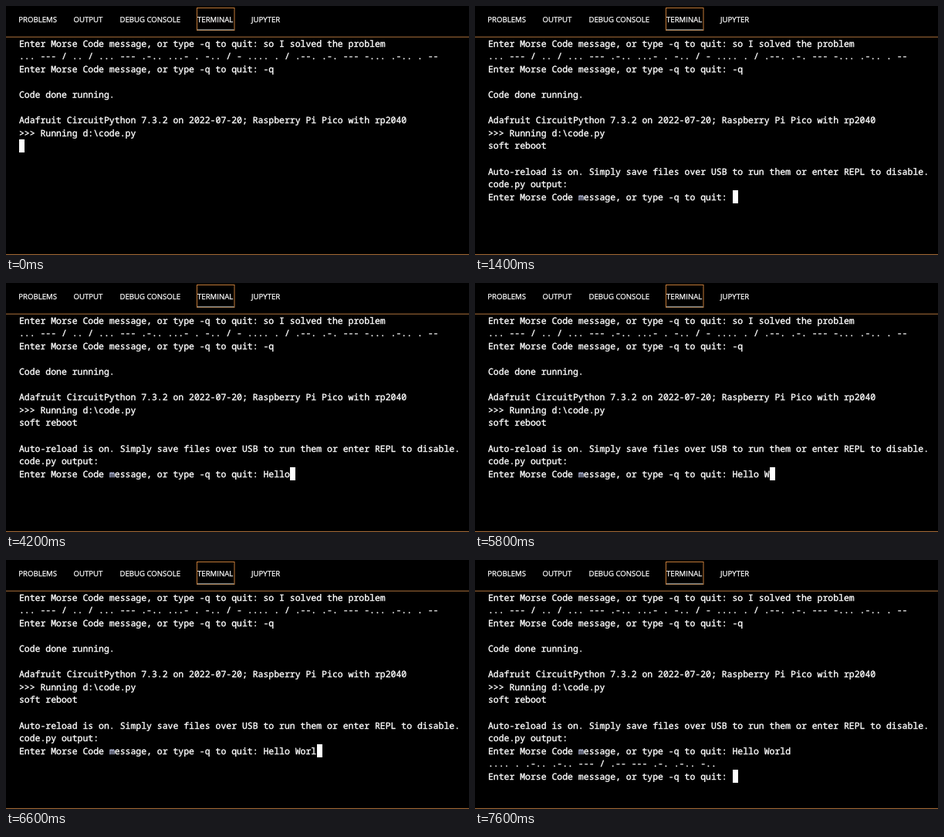
Write an HTML page that moves like this. It is 600 px wide and 323 px high and loops after 8000 ms.

```html
<!DOCTYPE html>
<html lang="en">
<head>
<meta charset="utf-8">
<title>Morse code terminal</title>
<style>
  html, body { margin: 0; width: 100%; height: 100%; overflow: hidden; background: #000; }
  svg { display: block; width: 600px; height: 323px; }
  text { fill: #fff; stroke: #fff; stroke-width: .35px; white-space: pre; text-rendering: geometricPrecision; }
  .tabs text { font: 9.6px "Open Sans", "Noto Sans", sans-serif; stroke-width: .25px; }
  .rows text { font: 11.488px "Noto Sans Mono", "DejaVu Sans Mono", monospace; }
  .edge { fill: none; stroke: #b0733c; }
  .focus { fill: none; stroke: #c27a38; }
  .underline { stroke: #8fa3b0; }
  .pointed { fill: #c4ccf0; stroke: #c4ccf0; }
</style>
</head>
<body>
<svg viewBox="0 0 600 323">
  <rect width="600" height="323"/>
  <g class="tabs">
    <text x="16.3" y="21">PROBLEMS</text>
    <text x="87.5" y="21">OUTPUT</text>
    <text x="147.4" y="21">DEBUG CONSOLE</text>
    <text x="248" y="21">TERMINAL</text>
    <text x="318" y="21">JUPYTER</text>
  </g>
  <rect class="focus" x="247.5" y="2.5" width="48.5" height="29"/>
  <path class="underline" d="M248 30.8H295.5"/>
  <path class="edge" d="M0 40.2H600M0 322.4H600"/>
  <g class="rows" id="rows"></g>
  <rect id="cursor" width="7" height="17" fill="#fff"/>
</svg>
<script>
const LOOP = 8000;
const LEFT = 16.9, TOP = 39.9, CELL = 6.893, LINE = 16.6, BASELINE = 12.6;

const PROMPT = 'Enter Morse Code message, or type -q to quit: ';
const MESSAGE = 'Hello World';
const LOG = [
  PROMPT + 'so I solved the problem',
  '... --- / .. / ... --- .-.. ...- . -.. / - .... . / .--. .-. --- -... .-.. . --',
  PROMPT + '-q',
  '',
  'Code done running.',
  '',
  'Adafruit CircuitPython 7.3.2 on 2022-07-20; Raspberry Pi Pico with rp2040',
  '>>> Running d:\\code.py'
];
const REBOOT = [
  'soft reboot',
  '',
  'Auto-reload is on. Simply save files over USB to run them or enter REPL to disable.',
  'code.py output:'
];
const MORSE = '.... . .-.. .-.. --- / .-- --- .-. .-.. -..';

// [time in ms, letters typed so far]
const KEYS = [[3400, 1], [3800, 3], [4000, 4], [4200, 5], [4400, 6], [5800, 7],
              [6000, 8], [6400, 9], [6600, 10], [6800, 11]];

const rows = document.getElementById('rows');
const cursor = document.getElementById('cursor');

// The cursor always follows the last line.
function screenAt(t) {
  if (t < 1200) return [...LOG, ''];
  const typed = KEYS.reduce((n, [at, count]) => t >= at ? count : n, 0);
  const lines = [...LOG, ...REBOOT, PROMPT + MESSAGE.slice(0, typed)];
  if (t >= 7200) lines.push(MORSE);
  if (t >= 7400) lines.push(PROMPT);
  return lines;
}

function makeRow(line, i) {
  const el = document.createElementNS('http://www.w3.org/2000/svg', 'text');
  el.setAttribute('x', LEFT);
  el.setAttribute('y', TOP + i * LINE + BASELINE);
  el.textContent = line;
  // The resting mouse pointer tints one letter of the live prompt.
  if (i === LOG.length + REBOOT.length) {
    const at = PROMPT.indexOf('m');
    const tint = document.createElementNS(el.namespaceURI, 'tspan');
    tint.setAttribute('class', 'pointed');
    tint.textContent = line[at];
    el.replaceChildren(line.slice(0, at), tint, line.slice(at + 1));
  }
  return el;
}

let shown = '';
function draw() {
  const lines = screenAt(performance.now() % LOOP);
  const key = lines.join('\n');
  if (key !== shown) {
    shown = key;
    rows.replaceChildren(...lines.map(makeRow));
    const last = lines.length - 1;
    cursor.setAttribute('x', Math.round(LEFT + lines[last].length * CELL));
    cursor.setAttribute('y', Math.round(TOP + last * LINE));
  }
  requestAnimationFrame(draw);
}
draw();
</script>
</body>
</html>
```
